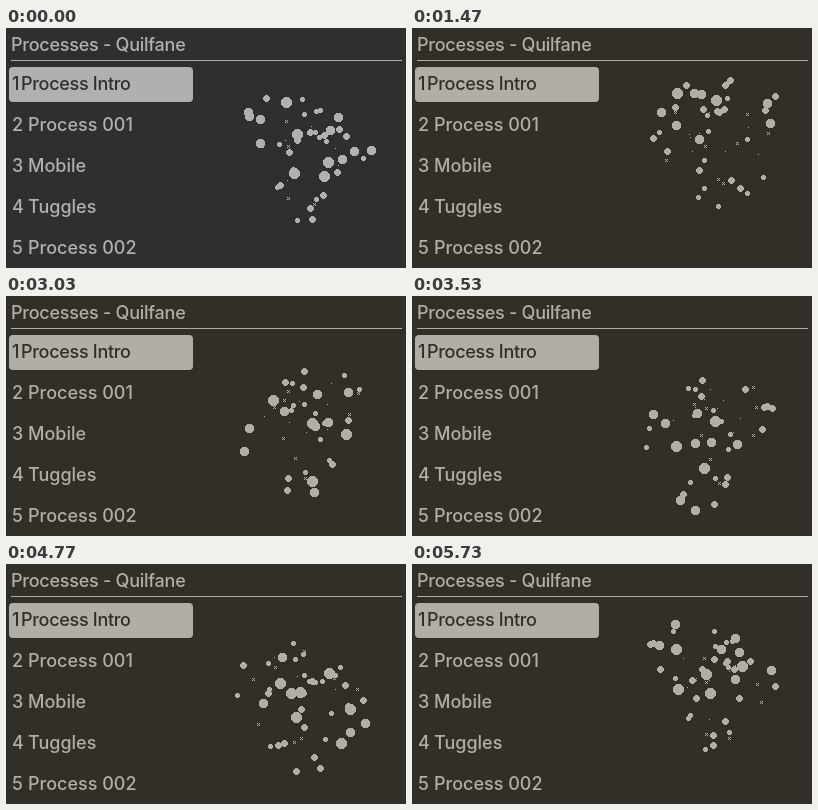
Write an HTML page with a canvas that moves like this. It is 400 px wide and 240 px high and loops after 5770 ms.

```html
<!DOCTYPE html>
<html lang="en">
<head>
<meta charset="utf-8">
<title>Processes</title>
<style>
  html, body { margin: 0; width: 400px; height: 240px; overflow: hidden; }
  body { --ink: #b1aea7; --paper: #322f28; background: var(--paper); }
  body.first { --ink: #b0b0b0; --paper: #2f2f2f; }
  svg, canvas { position: absolute; left: 0; top: 0; }
  svg { font: 500 18px Inter, Roboto, sans-serif; fill: var(--ink); }
  .on { fill: var(--paper); letter-spacing: -.3px; }
</style>
</head>
<body>
<svg width="400" height="240">
  <text x="5" y="23" letter-spacing="-.25">Processes - Quilfane</text>
  <rect x="5" y="32" width="391" height="1"/>
  <rect x="3" y="39" width="184" height="35" rx="4"/>
  <g class="on"><text x="6" y="62">1</text><text x="15" y="62">Process Intro</text></g>
  <text x="6" y="103">2</text><text x="22" y="103">Process 001</text>
  <text x="6" y="144">3</text><text x="22" y="144">Mobile</text>
  <text x="6" y="185">4</text><text x="22" y="185">Tuggles</text>
  <text x="6" y="226">5</text><text x="22" y="226">Process 002</text>
</svg>
<canvas width="400" height="240"></canvas>
<script>
const LOOP = 5770, STEPS = 173, TURN = 5400;
const COUNT = 52, RADIUS = 70, FOCUS = 250;
const ctx = document.querySelector("canvas").getContext("2d");

let seed = 2024;
const random = () => (seed = seed * 16807 % 2147483647) / 2147483647;

// Points spread evenly through a ball: height, distance from the axis, angle
const points = Array.from({ length: COUNT }, () => {
  const reach = RADIUS * Math.cbrt(random()), rise = 2 * random() - 1;
  return {
    y: reach * rise,
    ring: reach * Math.sqrt(1 - rise * rise),
    angle: random() * 2 * Math.PI
  };
});

// Hard-edged disc; distant ones are checkered
function dot(cx, cy, size) {
  const n = Math.floor(size), r = n + .5;
  cx = Math.round(cx);
  cy = Math.round(cy);
  for (let y = -n; y <= n; y++)
    for (let x = -n; x <= n; x++)
      if (x * x + y * y <= r * r && (n > 1 || (x + y) % 2 === 0))
        ctx.fillRect(cx + x, cy + y, 1, 1);
}

function draw(now) {
  const step = Math.floor(now % LOOP / LOOP * STEPS);
  const turn = step * LOOP / STEPS / TURN * 2 * Math.PI;
  const sway = Math.sin(turn);
  document.body.className = step ? "" : "first";
  ctx.clearRect(0, 0, 400, 240);
  ctx.fillStyle = step ? "#b1aea7" : "#b0b0b0";
  for (const { y, ring, angle } of points) {
    const x = ring * Math.cos(angle + turn), z = ring * Math.sin(angle + turn);
    const scale = FOCUS / (FOCUS - z);
    // The near side rises and sinks as the ball spins
    const tilted = y - .6 * sway * z;
    dot(300 + 7 * sway + x * scale, 122 - 16 * sway + tilted * scale, Math.max(0, 2.8 + z / 21));
  }
}

const begin = performance.now();
function tick() {
  draw(performance.now() - begin);
  requestAnimationFrame(tick);
}
tick();
</script>
</body>
</html>
```
